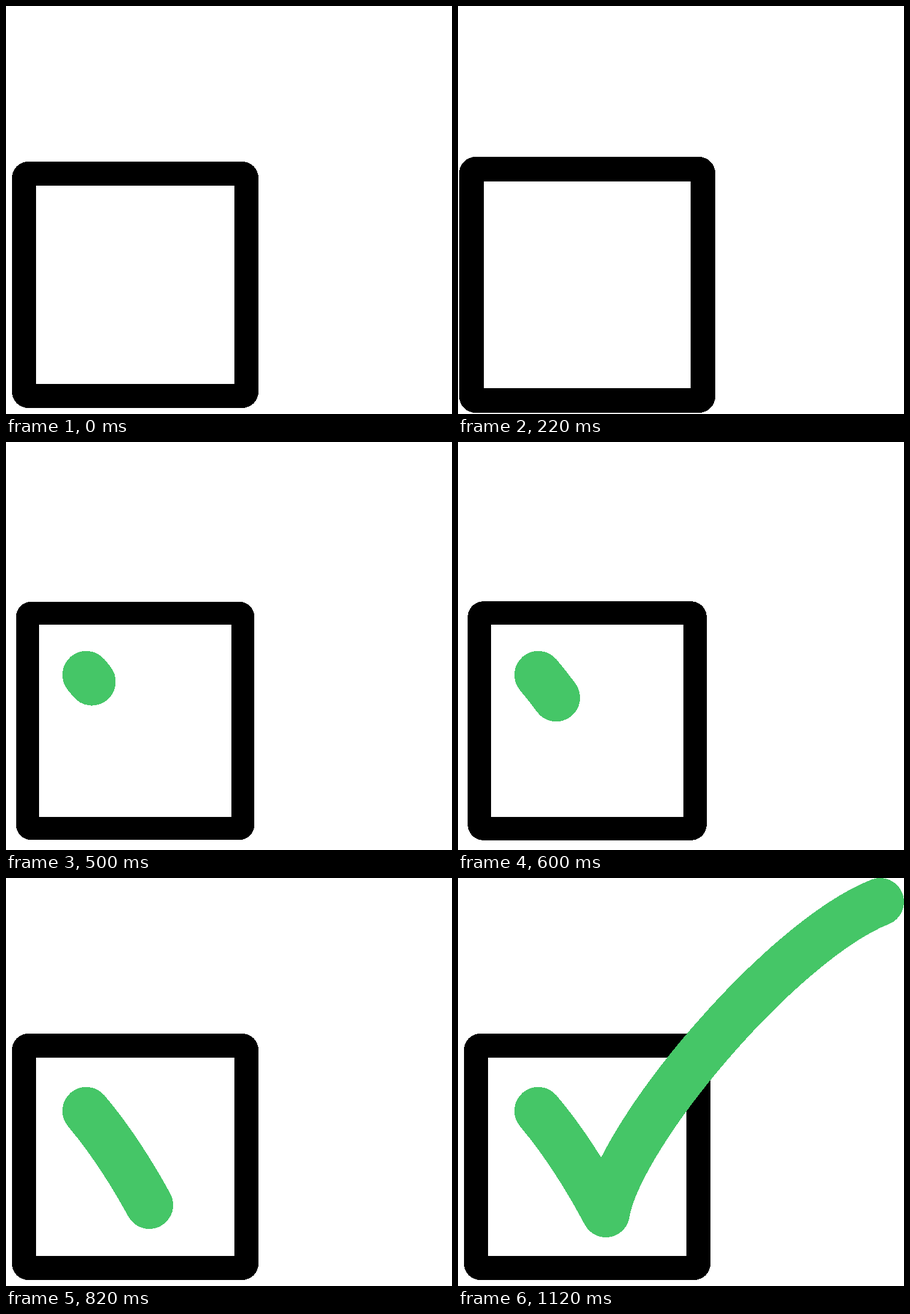
These frames come from a looping animation (742 by 679 pixels, 3600 ms). An HTML page:

```html
<!DOCTYPE html>
<html lang="en">
<head>
<meta charset="utf-8">
<title>Checkbox</title>
<style>
  html, body { margin: 0; width: 100%; height: 100%; overflow: hidden; background: #fff; }
  svg { display: block; width: 742px; height: 679px; shape-rendering: crispEdges; }
  .arm { fill: none; stroke: #45c667; stroke-width: 79.5; stroke-linecap: round; }
</style>
</head>
<body>
<svg viewBox="0 0 742 679">
  <g id="box">
    <rect x="-205" y="-205" width="410" height="410" rx="27"/>
    <rect x="-165" y="-165" width="330" height="330" fill="#fff"/>
  </g>
  <path id="short" class="arm" pathLength="1" d="M133.5 387.5Q192 457 246 558.3"/>
  <path id="long" class="arm" pathLength="1" d="M246 558.3C269 424 538 105 702.3 39.7"/>
</svg>
<script>
const LOOP = 3600, STEP = 20;
const box = document.getElementById('box');
const short = document.getElementById('short');
const long = document.getElementById('long');

const progress = (t, from, to) => Math.min(1, Math.max(0, (t - from) / (to - from)));
const easeIn = u => u * u;
const easeOut = u => 1 - (1 - u) * (1 - u);

// Swell, shrink, settle
function boxScale(t) {
  return 1 + 0.05 * progress(t, 0, 275)
           - 0.1 * progress(t, 275, 550)
           + 0.05 * progress(t, 550, 675);
}

function reveal(arm, part) {
  arm.style.visibility = part > 0 ? 'visible' : 'hidden';
  arm.style.strokeDasharray = part < 1 ? `${part} 2` : 'none';
}

function draw(t) {
  box.setAttribute('transform', `translate(215 464) scale(${boxScale(t)})`);
  reveal(short, easeIn(progress(t, 375, 838)));
  reveal(long, easeOut(progress(t, 838, 1100)));
}

const start = performance.now();
function tick() {
  const t = (performance.now() - start) % LOOP;
  draw(Math.floor(t / STEP) * STEP);
  requestAnimationFrame(tick);
}
draw(0);
requestAnimationFrame(tick);
</script>
</body>
</html>
```
